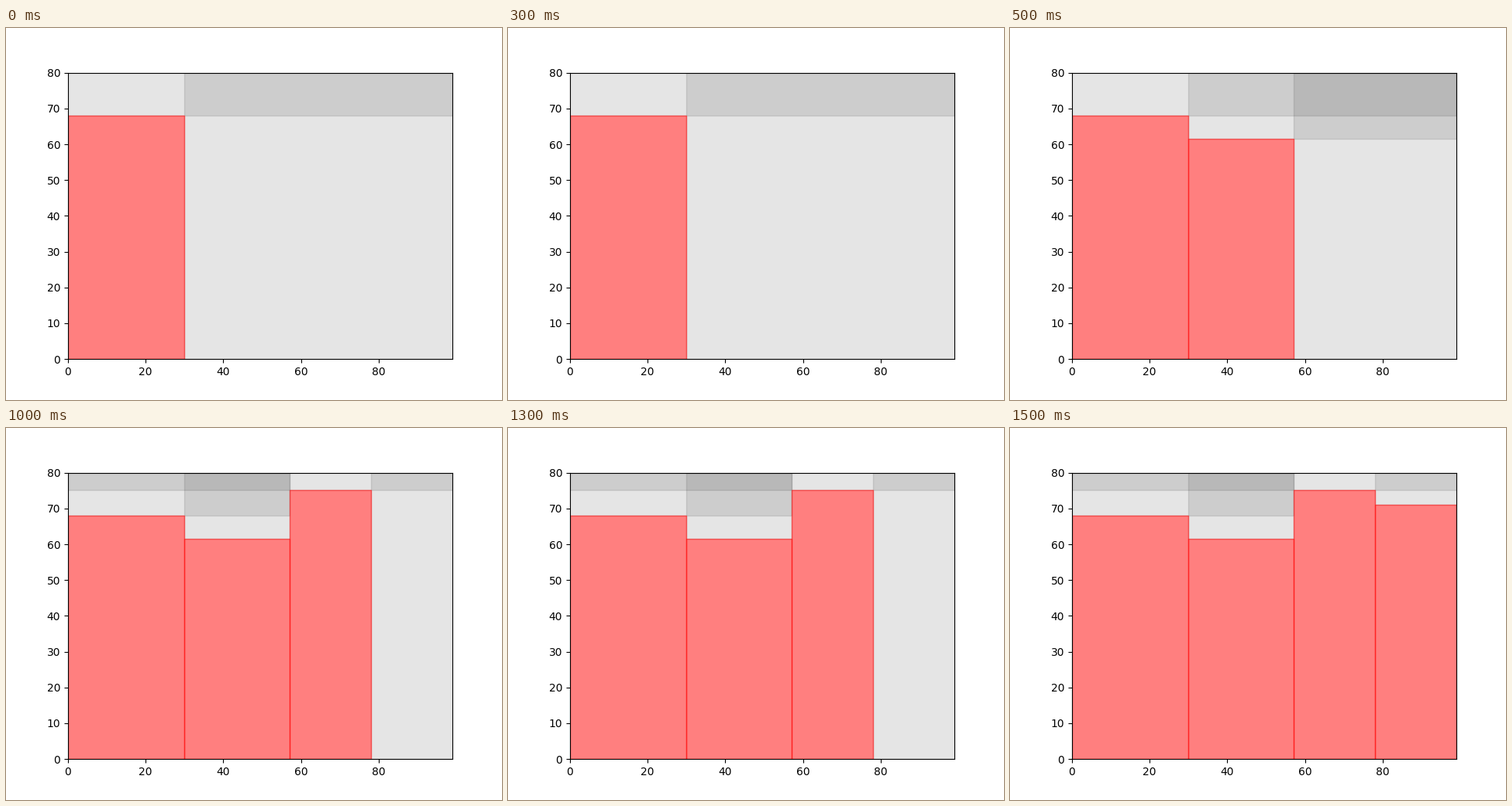
A matplotlib script for the animation above (2000 ms loop, 640 px wide and 480 px high).

```python
import matplotlib.pyplot as plt
from matplotlib.animation import FuncAnimation
from matplotlib.patches import Rectangle

WIDTH, HEIGHT = 99, 80
BOXES = [(30, 68), (27, 61.5), (21, 75.1), (21, 71)]


def split(free, used):
    """Largest rectangles of `free` left over once `used` is cut out."""
    x0, y0, x1, y1 = free
    u0, v0, u1, v1 = used
    if u0 >= x1 or u1 <= x0 or v0 >= y1 or v1 <= y0:
        return [free]
    parts = [(x0, y0, u0, y1), (u1, y0, x1, y1),
             (x0, y0, x1, v0), (x0, v1, x1, y1)]
    return [p for p in parts if p[0] < p[2] and p[1] < p[3]]


def inside(a, b):
    return a[0] >= b[0] and a[1] >= b[1] and a[2] <= b[2] and a[3] <= b[3]


def prune(rects):
    rects = sorted(set(rects))
    return [a for a in rects
            if not any(a != b and inside(a, b) for b in rects)]


def pack(count):
    """Place the first boxes side by side; return free and used areas."""
    free, used, x = [(0, 0, WIDTH, HEIGHT)], [], 0
    for w, h in BOXES[:count]:
        box = (x, 0, x + w, h)
        used.append(box)
        free = prune([p for f in free for p in split(f, box)])
        x += w
    return free, used


fig, ax = plt.subplots(figsize=(6.4, 4.8), dpi=100)
ax.set_xlim(0, WIDTH)
ax.set_ylim(0, HEIGHT)


def add_rects(rects, color, alpha):
    for x0, y0, x1, y1 in rects:
        ax.add_patch(Rectangle((x0, y0), x1 - x0, y1 - y0,
                               color=color, alpha=alpha))


def draw(step):
    for patch in list(ax.patches):
        patch.remove()
    free, used = pack(step + 1)
    add_rects(free, "black", 0.1)
    add_rects(used, "red", 0.5)
    return list(ax.patches)


anim = FuncAnimation(fig, draw, frames=len(BOXES), interval=500,
                     init_func=lambda: draw(0), repeat=True, repeat_delay=0)
plt.show()
```
